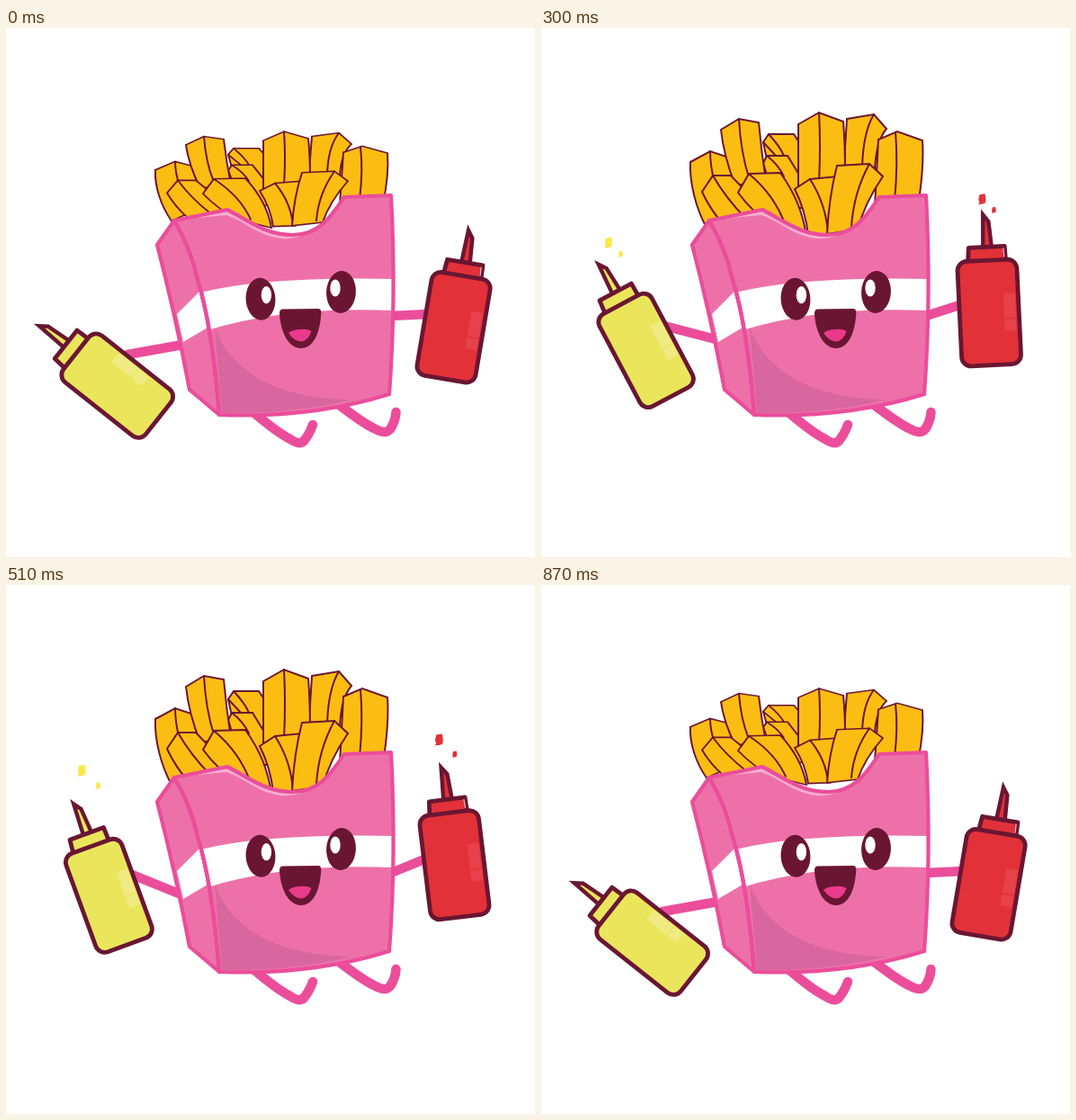
An HTML page with a canvas that plays this animation: 588 by 588 pixels, repeating every 0.9 s.

```html
<!DOCTYPE html>
<html lang="en">
<head>
<meta charset="utf-8">
<title>Happy fries</title>
<style>
  html, body { margin: 0; width: 100%; height: 100%; overflow: hidden; background: #fff; }
  canvas { display: block; }
</style>
</head>
<body>
<canvas id="stage" width="588" height="588"></canvas>
<script>
const ctx = document.getElementById('stage').getContext('2d');
const LOOP = 900, STEP = 30;
const DARK = '#6a1632', PINK = '#ed71a8', EDGE = '#eb4d9b', FRY = '#fcbd12';

const lerp = (a, b, p) => a + (b - a) * p;

// Piecewise linear track of [time, value] keys
function track(keys, t) {
  let prev = keys[0];
  for (const key of keys) {
    if (t <= key[0]) {
      const span = key[0] - prev[0];
      return span ? lerp(prev[1], key[1], (t - prev[0]) / span) : key[1];
    }
    prev = key;
  }
  return prev[1];
}

const swing = [[0, 1], [90, 0], [240, 0], [390, 1], [540, 0], [690, 1]];
const blink = [[90, 1], [150, 0.34], [240, 1]];
const rise = [[0, 0], [90, 1], [840, 1], [870, 0]];

function shape(d, fill, stroke, width) {
  const path = new Path2D(d);
  if (fill) { ctx.fillStyle = fill; ctx.fill(path); }
  if (stroke) { ctx.strokeStyle = stroke; ctx.lineWidth = width; ctx.stroke(path); }
}

function oval(x, y, rx, ry, tilt, fill) {
  ctx.beginPath();
  ctx.ellipse(x, y, rx, ry, tilt, 0, 7);
  ctx.fillStyle = fill;
  ctx.fill();
}

// Outline and ridge of every fry, back to front
const fries = [
  ['M247 127L253 118H281L287 127V165H255Z', 'M253 118Q266 132 270 142M247 127L262 143'],
  ['M247 150L251 142H274L290 168V200H262Z', 'M251 142Q264 152 270 165'],
  ['M166 149L188 137L206 143L222 200L184 222C172 200 165 172 166 149Z', 'M188 137Q188 153 193 172'],
  ['M200 113L220 101L242 105Q245 138 250 170L216 175Q203 142 200 113Z', 'M220 101Q222 138 231 166'],
  ['M340 101L370 96L384 112Q372 126 371 160L336 165Z', 'M370 96Q358 116 357 155'],
  ['M286 107L309 94L336 104Q338 130 338 160L328 180H286Z', 'M309 94Q311 130 309 172'],
  ['M375 124L396 115L424 125Q426 155 419 198H371Z', 'M394 116Q397 150 393 192'],
  ['M179 182L191 164H211L232 186L245 216L204 220Q188 202 179 182Z', 'M191 164Q206 190 228 212'],
  ['M219 183L231 162L266 161Q290 194 295 232L258 220Q236 206 219 183Z', 'M231 162Q260 186 272 220'],
  ['M282 179L299 168L329 165L322 229L297 230Q294 203 282 179Z', 'M299 168Q317 196 319 229'],
  ['M329 153L365 151L380 165Q360 194 352 224L318 229Q320 188 329 153Z', 'M365 151Q347 184 345 222']
];

function drawFries(up) {
  ctx.save();
  ctx.translate(0, 188);
  ctx.scale(1, lerp(0.776, 1, up));
  ctx.translate(0, -188);
  ctx.lineJoin = 'miter';
  for (const [body, ridge] of fries) {
    shape(body, FRY, DARK, 2);
    shape(ridge, null, DARK, 2);
  }
  ctx.restore();
}

function drawBox() {
  const side = 'M187 214L168 241Q189 322 204 402L237 430Q229 330 213 280Q205 244 187 214Z';
  const front = 'M187 214L246 202C270 214 288 230 319 230C349 230 362 208 376 188L428 186' +
    'Q434 300 426 407Q340 434 237 430Q229 330 213 280Q205 244 187 214Z';
  ctx.lineJoin = 'round';
  shape(side, PINK);
  shape(front, PINK);
  shape('M190 318L215 293L224 333L197 349Z', '#fff');
  shape('M216 294Q290 276 431 279L430 314Q310 309 224 336Z', '#fff');
  shape('M232 333C252 386 306 412 384 413Q320 429 240 428Z', '#d9679f');
  shape('M190 213L246 202C270 214 288 228 319 228Q334 229 344 221Q328 236 306 234C280 231 266 215 245 208Z', '#f5add1');
  shape(side, null, EDGE, 4.2);
  shape(front, null, EDGE, 4.2);
}

function drawEye(x, y, glintX, glintY, tilt, open) {
  ctx.save();
  ctx.translate(x, y);
  ctx.scale(1, open);
  oval(0, 0, 16.4, 23.5, tilt, DARK);
  oval(glintX, glintY, 5.7, 9.6, 0, '#fff');
  ctx.restore();
}

function drawFace(open) {
  drawEye(283, 301.2, 6.4, -4.5, -0.06, open);
  drawEye(372.5, 293.5, -6.5, -4.5, 0.06, open);
  ctx.save();
  ctx.translate(327, 334);
  ctx.scale(1, open);
  shape('M-20 -21.5L20 -22Q23.5 -22 23.3 -17C22 6 14 22 1 22C-13 22 -22 4 -23 -17Q-23 -21 -20 -21.5Z', DARK);
  shape('M-13 5Q-8 1 0 1Q8 0 12.5 3Q9 14 1 14.5Q-7 14 -13 5Z', '#ea3a8c');
  ctx.restore();
}

function drawLimb(d) {
  ctx.lineCap = ctx.lineJoin = 'round';
  shape(d, null, EDGE, 10.5);
}

function drawDrop(from, to, p, size, color) {
  ctx.save();
  ctx.translate(lerp(from[0], to[0], p), lerp(from[1], to[1], p));
  const s = size * (1 - 0.35 * p);
  ctx.scale(s, s);
  shape('M-3 -6L4 -7.2Q6 0 4.5 4.5Q1 7 -5 6.5Q-1.5 4 -4.5 1Z', color);
  ctx.restore();
}

function drawBottle(b, p) {
  if (p < 0.99) {
    drawDrop(b.drops[0], b.spout, p, 1, b.drip);
    drawDrop(b.drops[1], b.spout, p, 0.57, b.drip);
  }
  ctx.save();
  ctx.translate(lerp(b.up[0], b.down[0], p), lerp(b.up[1], b.down[1], p));
  ctx.rotate(lerp(b.up[2], b.down[2], p) * Math.PI / 180);
  ctx.lineCap = 'butt';
  ctx.lineJoin = 'miter';
  shape('M-3.5 -73L-1.8 -109L4 -101L6 -73Z', b.fill, DARK, 4.4);
  ctx.lineJoin = 'round';
  shape('M-21 -57L-19.5 -73H20.5L21 -57Z', b.fill, DARK, 4.8);
  if (b.shine) shape('M19 -71L19.5 -61', null, b.shine, 1.3);
  ctx.beginPath();
  ctx.roundRect(-33, -58, 66, 116.5, 10.5);
  ctx.fillStyle = b.fill;
  ctx.fill();
  ctx.strokeStyle = DARK;
  ctx.lineWidth = 4.8;
  ctx.stroke();
  ctx.fillStyle = b.light;
  ctx.fillRect(16.5, -21, 13, 28);
  ctx.fillRect(16.5, 8.3, 13, 13);
  ctx.restore();
}

// Poses hold x, y and angle in degrees
const mustard = {
  up: [112, 332, -12.2], down: [123.5, 397.5, -51.6],
  drops: [[93, 174], [116, 195]], spout: [47, 336],
  fill: '#ebe55c', light: '#efeb82', drip: '#fde748'
};
const ketchup = {
  up: [498.7, 305.5, -11], down: [497.6, 332.5, 9.6],
  drops: [[472, 154], [494, 174]], spout: [517, 245],
  fill: '#e23138', light: '#e74149', drip: '#e23138', shine: '#f6b9bd'
};

function draw(t) {
  const p = track(swing, t);
  ctx.fillStyle = '#fff';
  ctx.fillRect(0, 0, 588, 588);
  drawLimb(`M202 ${lerp(346, 351, p)}L135 ${lerp(309, 363, p)}`);
  drawLimb(`M428 320L470 ${lerp(299, 318, p)}`);
  drawLimb('M276 428Q302 450 316 457Q326 464 331 459Q337 452 341 441');
  drawLimb('M368 417Q396 439 411 446Q422 452 427 446Q433 437 433.5 427');
  drawFries(track(rise, t));
  drawBox();
  drawFace(track(blink, t));
  drawBottle(mustard, p);
  drawBottle(ketchup, p);
}

function tick(now) {
  draw(Math.floor((now + 0.5) / STEP) * STEP % LOOP);
  requestAnimationFrame(tick);
}
draw(0);
requestAnimationFrame(tick);
</script>
</body>
</html>
```
